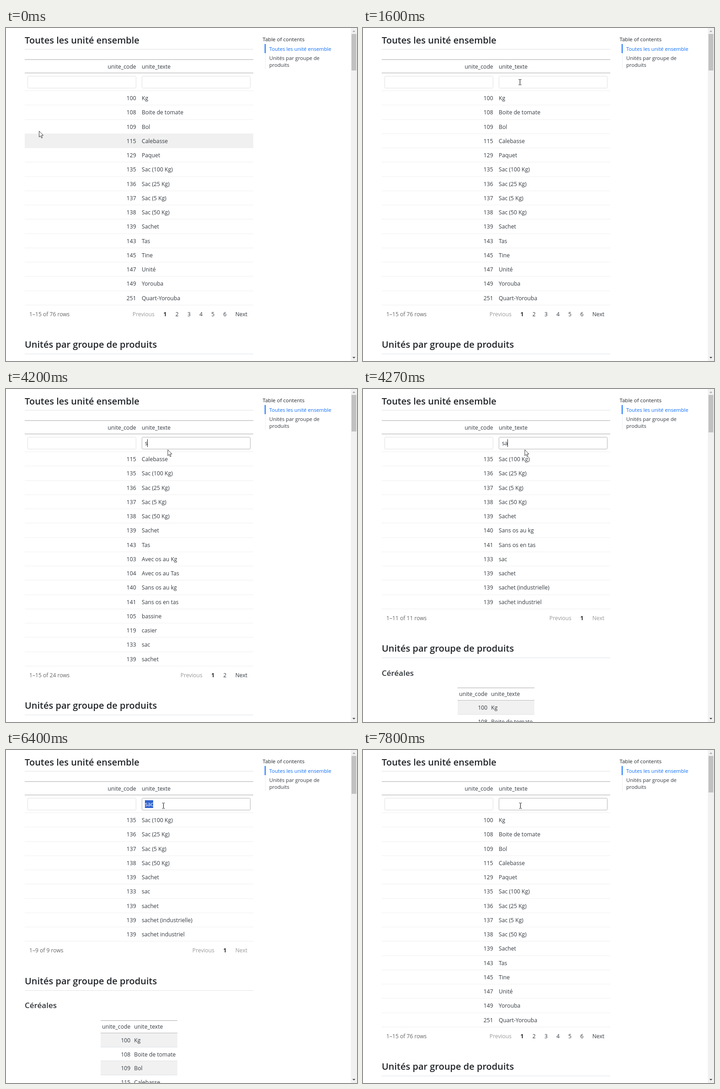
An HTML page with a canvas for the animation above (8000 ms loop, 768x729 px).

```html
<!DOCTYPE html>
<html lang="fr">
<head>
<meta charset="utf-8">
<title>Toutes les unité ensemble</title>
<style>
  html, body { margin: 0; width: 100%; height: 100%; overflow: hidden; background: #fff; }
  canvas { display: block; width: 768px; height: 729px; }
</style>
</head>
<body>
<canvas id="stage" width="768" height="729"></canvas>
<script>
const ctx = document.getElementById('stage').getContext('2d');
const LOOP = 8000;
const ROW_TOP = 137.2, ROW_H = 31.25, PAGE_ROWS = 15;
const INK = '#343a40', DARK = '#212529', MUTED = '#666', FAINT = '#999', RULE = '#b9b9b9';
const FAMILY = '"Open Sans", "Noto Sans", sans-serif';
const BODY = `12.2px ${FAMILY}`, FOOT = `12.1px ${FAMILY}`, BOLD = `bold 12.1px ${FAMILY}`;
const H2 = `600 20px ${FAMILY}`, H3 = `600 17px ${FAMILY}`;
const TOC = `11.2px ${FAMILY}`, TOC_TITLE = `500 11.5px ${FAMILY}`;

const parse = list => list.split('|').map(s => [s.slice(0, 3), s.slice(4)]);
const sacks = '135 Sac (100 Kg)|136 Sac (25 Kg)|137 Sac (5 Kg)|138 Sac (50 Kg)|139 Sachet|';
const smallSacks = '133 sac|139 sachet|139 sachet (industrielle)|139 sachet industriel';
const tables = {
  '': { total: 76, pages: 6, rows: parse('100 Kg|108 Boite de tomate|109 Bol|115 Calebasse|129 Paquet|' + sacks +
    '143 Tas|145 Tine|147 Unité|149 Yorouba|251 Quart-Yorouba') },
  s: { total: 24, pages: 2, rows: parse('115 Calebasse|' + sacks +
    '143 Tas|103 Avec os au Kg|104 Avec os au Tas|140 Sans os au kg|141 Sans os en tas|' +
    '105 bassine|119 casier|133 sac|139 sachet') },
  sa: { total: 11, pages: 1, rows: parse(sacks + '140 Sans os au kg|141 Sans os en tas|' + smallSacks) },
  sac: { total: 9, pages: 1, rows: parse(sacks + smallSacks) }
};

// Each track holds [start time, value] steps.
const queryTrack = [[0, ''], [4200, 's'], [4270, 'sa'], [4670, 'sac'], [7270, '']];
const caretTrack = [[0, false], [2870, true], [3400, false], [4000, true], [5200, false],
  [5670, true], [6200, false], [7270, true], [7800, false]];
const pointerTrack = [[1660, [343.5, 118.5]], [2130, [344.5, 119]], [2200, [345.5, 119.5]],
  [3530, [350, 127]], [3600, [354, 133]], [5670, [355, 128]], [5730, [356.5, 125]],
  [5870, [349, 123]], [5930, [344.5, 122]]];

function at(track, t) {
  let value = track[0][1];
  for (const [start, v] of track) if (t >= start) value = v;
  return value;
}

const sweepStep = t => Math.max(0, Math.min(13, Math.floor((t - 796) / 66.6) + 1));

function sweep(step) {
  const left = 1 - step / 13;
  return [72.5 + 271 * (1 - left ** 1.3), 225.7 - 107.2 * (1 - left ** 1.81)];
}

function pointerAt(t) {
  return t < 1660 ? sweep(sweepStep(t)) : at(pointerTrack, t);
}

// The highlighted row trails the pointer by one step.
function hoverAt(t) {
  if (t < 70) return 3;
  if (t > 1660) return -1;
  const y = sweep(Math.max(0, sweepStep(t) - 1))[1];
  return Math.floor((y - ROW_TOP) / ROW_H);
}

function rect(x, y, w, h, color) {
  ctx.fillStyle = color;
  ctx.fillRect(x, y, w, h);
}

function text(str, x, y, font = BODY, color = INK, align = 'left') {
  ctx.font = font;
  ctx.fillStyle = color;
  ctx.textAlign = align;
  ctx.fillText(str, x, Math.round(y));
}

function polygon(points, color) {
  ctx.beginPath();
  points.forEach(([x, y]) => ctx.lineTo(x, y));
  ctx.closePath();
  ctx.fillStyle = color;
  ctx.fill();
}

function heading(str, y) {
  text(str, 41, y, H2, DARK);
  rect(41, Math.round(y + 12.8), 500, 1, '#dee2e6');
}

function field(x, color) {
  ctx.beginPath();
  ctx.roundRect(x + 0.5, 105.5, 237, 26, 2);
  ctx.strokeStyle = color;
  ctx.lineWidth = 1;
  ctx.stroke();
}

function filterField(query, t) {
  field(47, '#e1e1e1');
  field(297, t >= 2870 ? '#b3b3b3' : '#e1e1e1');
  const selected = t >= 6400 && t < 7270;
  if (selected) rect(304, 110, 18, 17, '#3063cf');
  text(query, 304, 123, BODY, selected ? '#fff' : INK);
  if (at(caretTrack, t)) {
    const x = Math.max(304, Math.floor(303.5 + ctx.measureText(query).width));
    rect(x, 110, 1, 17, '#222');
  }
}

function mainTable({ rows }, hover) {
  rect(41, 68.4, 500, 1.3, RULE);
  text('unite_code', 284.7, 89, BODY, INK, 'right');
  text('unite_texte', 297, 89);
  rect(41, 97.8, 500, 1.3, RULE);
  rows.forEach(([code, label], i) => {
    const y = ROW_TOP + i * ROW_H;
    if (i === hover) rect(41, Math.round(y), 500, 32, '#f0f0f0');
    else rect(41, Math.round(y), 500, 1, '#f0f0f0');
    text(code, 284.7, y + 20.8, BODY, INK, 'right');
    text(label, 297, y + 20.8);
  });
  rect(41, Math.round(ROW_TOP + rows.length * ROW_H), 500, 1, '#f0f0f0');
}

function pager({ rows, total, pages }, shift) {
  const y = 630.8 - shift;
  text(`1–${rows.length} of ${total} rows`, 51, y, FOOT, MUTED);
  for (let p = 1; p <= pages; p++) {
    text(p, 479 - (pages - p) * 26.2, y, p === 1 ? BOLD : FOOT, p === 1 ? DARK : INK, 'center');
  }
  text('Previous', 456 - (pages - 1) * 26.2, y, FOOT, FAINT, 'right');
  text('Next', 528, y, FOOT, pages > 1 ? INK : FAINT, 'right');
}

function productSection(shift) {
  heading('Unités par groupe de produits', 700.4 - shift);
  text('Céréales', 41, 752.5 - shift, H3, '#33373b');
  const top = Math.round(779 - shift);
  rect(207, top - 0.3, 168, 1.3, RULE);
  text('unite_code', 272.3, top + 18, BODY, INK, 'right');
  text('unite_texte', 280.3, top + 18);
  tables[''].rows.slice(0, 4).forEach(([code, label], i) => {
    const y = top + 27.4 + i * 30.5;
    if (i % 2 === 0) rect(207, Math.round(y), 168, 31, '#f1f1f1');
    rect(207, Math.round(y), 168, 1, i ? '#dee2e6' : RULE);
    text(code, 272.3, y + 21, BODY, INK, 'right');
    text(label, 280.3, y + 21);
  });
}

function contents() {
  text('Table of contents', 561.5, 29, TOC_TITLE, DARK);
  rect(566, 35, 2, 20, '#0d6efd');
  rect(567, 55, 1, 35, '#e9ecef');
  text('Toutes les unité ensemble', 576, 50, TOC, '#0d6efd');
  text('Unités par groupe de', 576, 70, TOC);
  text('produits', 576, 85, TOC);
}

function scrollbar(rowCount) {
  rect(754.5, 0, 13.5, 729, '#f1f1f1');
  rect(756, 13, 10.5, 80 + (PAGE_ROWS - rowCount) * 0.5, '#c1c1c1');
  polygon([[758, 8.6], [761.2, 5.2], [764.4, 8.6]], '#a3a3a3');
  polygon([[758, 720], [761.2, 723.4], [764.4, 720]], '#505050');
}

function arrow(x, y) {
  const outline = [[0, 0], [0, 13], [3, 10.3], [5.2, 15.2], [7.2, 14.3], [5, 9.6], [9, 9.3]];
  polygon(outline.map(([dx, dy]) => [x + dx, y + dy]), '#fff');
  ctx.strokeStyle = '#222';
  ctx.lineWidth = 0.9;
  ctx.stroke();
}

function beam(x, y) {
  rect(x - 0.6, y - 5.5, 1.2, 11, '#222');
  for (const dy of [-6.5, 5.5]) {
    rect(x - 3, y + dy, 2.5, 1, '#222');
    rect(x + 0.5, y + dy, 2.5, 1, '#222');
  }
}

function pointer([x, y]) {
  const inField = y > 105 && y < 131 && ((x > 47 && x < 285) || (x > 297 && x < 535));
  (inField ? beam : arrow)(x, y);
}

function draw(t) {
  const query = at(queryTrack, t);
  const table = tables[query];
  const shift = (PAGE_ROWS - table.rows.length) * ROW_H;
  rect(0, 0, 768, 729, '#fff');
  heading('Toutes les unité ensemble', 33.6);
  mainTable(table, hoverAt(t));
  filterField(query, t);
  pager(table, shift);
  productSection(shift);
  contents();
  scrollbar(table.rows.length);
  pointer(pointerAt(t));
}

const start = performance.now();
function tick() {
  draw((performance.now() - start) % LOOP);
  requestAnimationFrame(tick);
}
tick();
</script>
</body>
</html>
```
